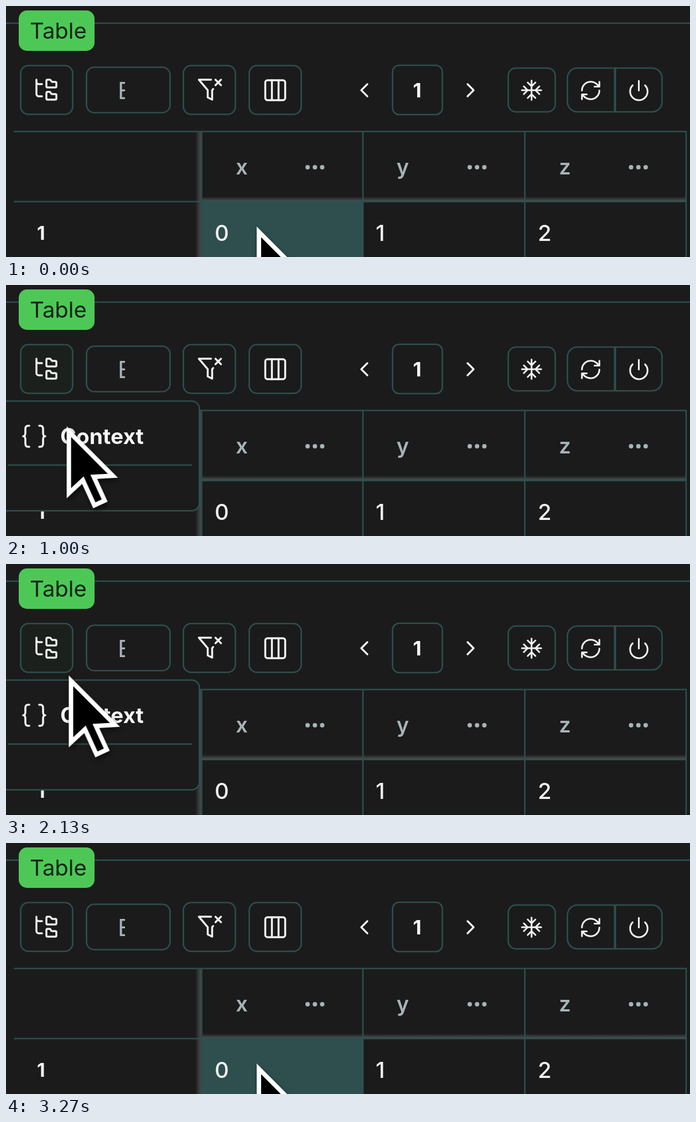
An HTML page for the animation above (3.39 s loop, 1236 by 453 pixels).

```html
<!DOCTYPE html>
<html lang="en">
<head>
<meta charset="utf-8">
<title>Table menu</title>
<style>
  html, body { margin: 0; width: 100%; height: 100%; overflow: hidden; background: #1b1b1b; }
  svg { display: block; width: 1236px; height: 453px; font-family: Inter, Roboto, sans-serif; }
  :root { --edge: #2f4f4f; --green: #4dc856; --muted: #a8b3b7; --ink: #f2f2f2; }

  .line { fill: none; stroke: var(--edge); stroke-width: 2.6; }
  .icon { fill: none; stroke: var(--ink); stroke-linecap: round; stroke-linejoin: round; stroke-width: 1.75; }
  .head { fill: var(--muted); font-size: 38px; font-weight: 600; }
  .num { fill: var(--ink); font-size: 40px; font-weight: 500; }
  .bold { fill: #f6f6f6; font-weight: 700; }

  .anim { animation: 3390ms linear infinite; }
  .cell { animation-name: cell; }
  .hover { fill: var(--green); animation-name: hover; }
  .tree { animation-name: tree; }
  .menu { animation-name: menu; }
  .move { animation-name: move; animation-timing-function: cubic-bezier(.65, 0, .35, 1); }
  .tilt { animation-name: tilt; animation-timing-function: ease-in-out; }
  .press { animation-name: press; animation-timing-function: ease-in-out; }
  .arrow { animation-name: arrow; animation-timing-function: step-end; }
  .hand { animation-name: hand; animation-timing-function: step-end; }
  .cursor { filter: drop-shadow(2px 5px 4px rgba(0, 0, 0, .55)); }

  @keyframes cell {
    0%, 3% { opacity: 1; }
    4.5%, 81% { opacity: 0; }
    83.5%, 100% { opacity: 1; }
  }
  @keyframes hover {
    0%, 12% { opacity: 0; }
    14.5%, 17.4% { opacity: 1; }
    20%, 69.5% { opacity: .03; }
    72%, 81% { opacity: 1; }
    84%, 100% { opacity: 0; }
  }
  @keyframes tree {
    0%, 12% { stroke: #f2f2f2; }
    14.5%, 17.4% { stroke: #122416; }
    19.5%, 69.5% { stroke: #f2f2f2; }
    72%, 81% { stroke: #122416; }
    84%, 100% { stroke: #f2f2f2; }
  }
  @keyframes menu {
    0%, 17.4% { opacity: 0; transform: translateY(-10px); animation-timing-function: ease-out; }
    20.4%, 68.4% { opacity: 1; transform: none; }
    70.8%, 100% { opacity: 0; transform: translateY(-8px); }
  }
  @keyframes move {
    0%, 1.77% { transform: translate(453px, 398px); }
    17.4%, 22% { transform: translate(100px, 165px); }
    37%, 54% { transform: translate(119px, 343px); }
    68.1%, 69.9% { transform: translate(112px, 165px); }
    80.5%, 100% { transform: translate(453px, 398px); }
  }
  @keyframes tilt {
    0%, 2% { transform: none; }
    9%, 12% { transform: rotate(-6deg); }
    18%, 70% { transform: none; }
    75%, 78% { transform: rotate(6deg); }
    83.5%, 100% { transform: none; }
  }
  @keyframes press {
    0%, 16.5% { transform: none; }
    18.8%, 20% { transform: scale(.9); }
    24%, 66.5% { transform: none; }
    68.8% { transform: scale(.9); }
    72%, 100% { transform: none; }
  }
  @keyframes arrow {
    0% { opacity: 1; }
    9.7% { opacity: 0; }
    18% { opacity: 1; }
    70.5% { opacity: 0; }
    75.5%, 100% { opacity: 1; }
  }
  @keyframes hand {
    0% { opacity: 0; }
    9.7% { opacity: 1; }
    18% { opacity: 0; }
    70.5% { opacity: 1; }
    75.5%, 100% { opacity: 0; }
  }
</style>
</head>
<body>
<svg viewBox="0 0 1236 453">
  <defs>
    <linearGradient id="glowX"><stop stop-color="#1b1b1b"/><stop offset="1" stop-color="#484a4a"/></linearGradient>
    <linearGradient id="glowY" x2="0" y2="1"><stop stop-color="#1b1b1b"/><stop offset="1" stop-color="#4a5050"/></linearGradient>
    <clipPath id="cut"><rect x="200" y="130" width="15" height="45"/></clipPath>
    <g id="dots" fill="#a8b3b7"><circle r="4"/><circle cx="13.2" r="4"/><circle cx="26.4" r="4"/></g>
  </defs>
  <rect width="1236" height="453" fill="#1b1b1b"/>

  <!-- title -->
  <path class="line" d="M0 31H1236"/>
  <rect x="23" y="8" width="137" height="73" rx="15" fill="#4dc856"/>
  <text x="43" y="59" font-size="40" fill="#112416">Table</text>

  <!-- toolbar -->
  <rect class="anim hover" x="27" y="108" width="93" height="87" rx="13"/>
  <g class="line">
    <rect x="26.5" y="107.5" width="94" height="88" rx="14"/>
    <rect x="145.5" y="110.5" width="151" height="82" rx="14"/>
    <rect x="320.5" y="107.5" width="94" height="88" rx="14"/>
    <rect x="439.5" y="107.5" width="94" height="88" rx="14"/>
    <rect x="698.5" y="107" width="90" height="89" rx="12"/>
    <rect x="907.5" y="112" width="85" height="79" rx="14"/>
    <rect x="1014.5" y="112" width="171" height="79" rx="18"/>
    <path d="M1100.5 112V191" stroke-width="4"/>
  </g>
  <g class="icon">
    <g class="anim tree" transform="translate(49 127) scale(2)">
      <path d="M20 10a1 1 0 0 0 1-1V6a1 1 0 0 0-1-1h-2.5a1 1 0 0 1-.8-.4l-.9-1.2A1 1 0 0 0 15 3h-2a1 1 0 0 0-1 1v5a1 1 0 0 0 1 1Z"/>
      <path d="M20 21a1 1 0 0 0 1-1v-3a1 1 0 0 0-1-1h-2.9a1 1 0 0 1-.88-.55l-.42-.85a1 1 0 0 0-.92-.6H13a1 1 0 0 0-1 1v5a1 1 0 0 0 1 1Z"/>
      <path d="M3 5a2 2 0 0 0 2 2h3M3 3v13a2 2 0 0 0 2 2h3"/>
    </g>
    <path transform="translate(344.5 127) scale(2)" d="M13 3H2l8 9.46V19l4 2v-8.54l.9-1.06M22 3l-5 5M17 3l5 5"/>
    <g transform="translate(462.5 128) scale(2)">
      <rect x="3" y="3" width="18" height="18" rx="2"/>
      <path d="M9 3v18M15 3v18"/>
    </g>
    <path transform="translate(928.7 131) scale(1.75)" d="M2 12h20M12 2v20M20 16l-4-4 4-4M4 8l4 4-4 4M16 4l-4 4-4-4M8 20l4-4 4 4"/>
    <path transform="translate(1035.5 131.5) scale(1.75)" d="M3 12a9 9 0 0 1 9-9 9.75 9.75 0 0 1 6.74 2.74L21 8M21 3v5h-5M21 12a9 9 0 0 1-9 9 9.75 9.75 0 0 1-6.74-2.74L3 16M8 16H3v5"/>
    <path transform="translate(1122.5 131.5) scale(1.75)" d="M12 2v10M18.4 6.6a9 9 0 1 1-12.77.04"/>
    <path stroke-width="3.4" style="stroke-width:3.4" d="M653 141L642 152L653 163M834 141L845 152L834 163"/>
  </g>
  <text class="head" x="202" y="168" style="font-size:42px;font-weight:400" clip-path="url(#cut)">E</text>
  <text class="bold" x="743" y="165" font-size="36" text-anchor="middle">1</text>

  <!-- table -->
  <rect class="anim cell" x="354" y="353" width="292" height="100" fill="#2f4f4f"/>
  <rect x="342" y="228" width="10" height="225" fill="url(#glowX)"/>
  <rect x="355" y="344" width="874" height="8" fill="url(#glowY)"/>
  <path class="line" d="M14 226.5H1230M14 353H1230M353.5 226V453M645 226V453M937.5 226V453M1229 226V453"/>
  <g class="head" text-anchor="middle">
    <text x="426" y="304">x</text><text x="717" y="304">y</text><text x="1010" y="304">z</text>
  </g>
  <use href="#dots" x="545" y="291"/><use href="#dots" x="838" y="291"/><use href="#dots" x="1129.5" y="291"/>
  <text class="bold" x="56" y="422" font-size="34">1</text>
  <g class="num">
    <text x="377" y="424">0</text><text x="668" y="424">1</text><text x="961" y="424">2</text>
  </g>

  <!-- menu -->
  <g class="anim menu">
    <rect x="-20" y="209.5" width="369.5" height="198" rx="14" fill="#1b1b1b" stroke="#2f4f4f" stroke-width="2.6"/>
    <path class="line" d="M3 325H336"/>
    <path class="icon" style="stroke-width:3.6" d="M42 254h-2q-5 0-5 6v7q0 6-4 6q4 0 4 6v7q0 6 5 6h2M60 254h2q5 0 5 6v7q0 6 4 6q-4 0-4 6v7q0 6-5 6h-2"/>
    <text class="bold" x="98" y="287" font-size="39">Context</text>
  </g>

  <!-- cursor -->
  <g class="anim move"><g class="anim tilt"><g class="anim press"><g class="cursor">
    <path class="anim arrow" fill="#000" stroke="#fff" stroke-width="8" stroke-miterlimit="6"
      d="M4 9.7V120.8L29.3 97.3L50 142.7L68.7 134L49 91.2L83.5 89.3Z"/>
    <g class="anim hand" stroke="#000" stroke-linejoin="round" stroke-linecap="round">
      <!-- drawn leaning left, so set upright before the tilt -->
      <g transform="rotate(6)">
        <path fill="#fff" stroke-width="6" d="M-8 10C-9 3-4 0 0 0C5 0 9 4 11 12L22 44L24 37Q32 30 42 37Q52 30 62 38Q72 33 80 40Q86 44 84 56L82 76C80 92 74 98 71 106L69 118L58 116Q52 112 48 118L17 121C15 112 8 104 0 97C-12 88-18 78-25 68C-32 60-28 52-20 52C-12 52-6 58-1 64Z"/>
        <path fill="none" stroke-width="5" d="M27 68l4 31M44 66l3 32M60 67l2 31"/>
      </g>
    </g>
  </g></g></g></g>
</svg>
</body>
</html>
```
